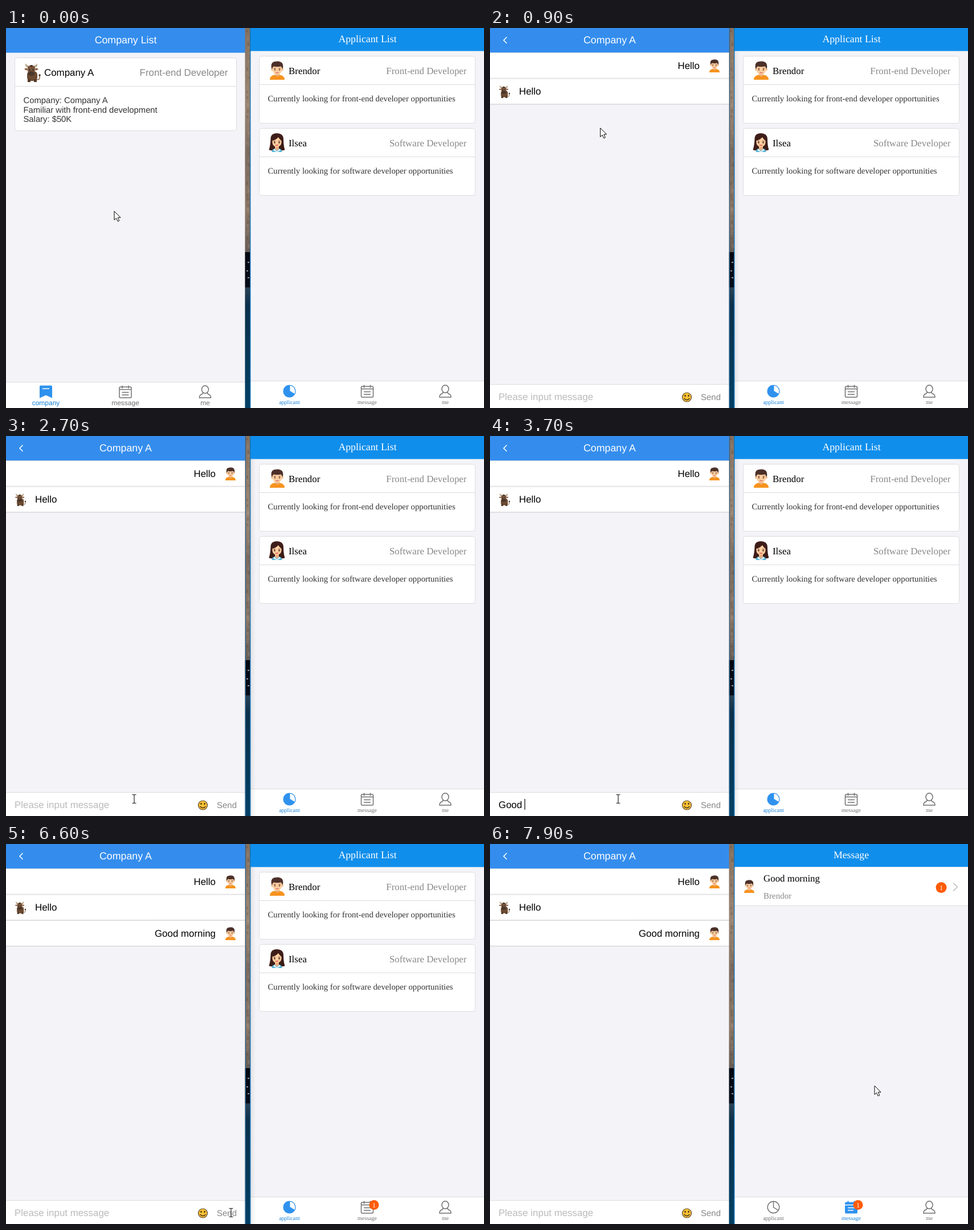
These frames come from a looping animation (839 by 668 pixels, 8000 ms). An HTML page:

```html
<!DOCTYPE html>
<html lang="en">
<head>
<meta charset="utf-8">
<title>Job chat</title>
<style>
  html, body { margin: 0; width: 100%; height: 100%; overflow: hidden; background: #f4f4f8; }
  svg { display: block; }
  text { white-space: pre; text-rendering: geometricPrecision; }
  .sans { font-family: "Liberation Sans", Arial, sans-serif; }
  .serif { font-family: "Liberation Serif", "Times New Roman", serif; }
  .title { font-size: 17.8px; fill: #fff; text-anchor: middle; }
  .main { font-size: 16.9px; fill: #000; }
  .role { font-size: 16.9px; fill: #888; text-anchor: end; }
  .body { font-size: 14.8px; fill: #333; }
  .hint { font-size: 15px; fill: #888; }
  .end { text-anchor: end; }
  .mid { text-anchor: middle; }
  .card { fill: #fff; stroke: #dcdce0; }
  .line { stroke: #dcdce0; }
  .rule { stroke: #d8d8dc; stroke-width: 1.6; }
  .off { color: #707070; }
  .on { color: #2f92ee; }
  .on text { fill: #1280d8; }
  .badge { fill: #ff5b05; }
</style>
</head>
<body>
<svg width="839" height="668" viewBox="0 0 839 668">
  <defs>
    <linearGradient id="photo" x1="0" y1="0" x2="0" y2="1">
      <stop offset="0" stop-color="#85705f"/>
      <stop offset=".2" stop-color="#9a8573"/>
      <stop offset=".34" stop-color="#7d6c5f"/>
      <stop offset=".48" stop-color="#8d7867"/>
      <stop offset=".59" stop-color="#665b54"/>
      <stop offset=".59" stop-color="#04070f"/>
      <stop offset=".682" stop-color="#070c18"/>
      <stop offset=".682" stop-color="#2c4254"/>
      <stop offset=".73" stop-color="#0b304a"/>
      <stop offset="1" stop-color="#024064"/>
    </linearGradient>
    <linearGradient id="shade">
      <stop offset="0" stop-color="#000" stop-opacity=".07"/>
      <stop offset="1" stop-color="#000" stop-opacity="0"/>
    </linearGradient>

    <symbol id="boy" viewBox="0 0 28 33">
      <path d="M1 33Q1 26 9 24.5H19Q27 26 27 33Z" fill="#f7931e"/>
      <path d="M10 20H18V25Q14 29 10 25Z" fill="#eeb183"/>
      <circle cx="5" cy="15" r="2" fill="#f3b98a"/>
      <circle cx="23" cy="15" r="2" fill="#f3b98a"/>
      <path d="M5.500 8H22.500V15Q21 23.500 14 24Q7 23.500 5.500 15Z" fill="#fdcc9d"/>
      <path d="M4 13Q2 2 10 1Q19-1 23 4Q25 7 24 13L22.500 13.500Q22.500 10.500 20.500 9.500Q13 11 8 9.500Q5.500 10.500 5.500 13.500Z" fill="#4c3029"/>
      <path d="M8 13H11.500M16.500 13H20" stroke="#5a382c"/>
      <circle cx="10" cy="15.500" r="1.100" fill="#412a24"/>
      <circle cx="18" cy="15.500" r="1.100" fill="#412a24"/>
      <path d="M11.500 20Q14 21.500 16.500 20" fill="none" stroke="#d0605a" stroke-width="1.200"/>
    </symbol>

    <symbol id="girl" viewBox="0 0 28 33">
      <path d="M3 10Q3 0 14 0Q25 0 25.500 10Q25.500 22 28 29Q25 31 20 30H8Q3 31 0 29Q2.500 22 3 10Z" fill="#3d1d18"/>
      <path d="M5 33Q5 28 10 27H18Q23 28 23 33Z" fill="#58b4d4"/>
      <path d="M10.500 21H17.500V27L14 31L10.500 27Z" fill="#edae82"/>
      <path d="M9.500 27L14 32L18.500 27L20 30L15 33H13L8 30Z" fill="#e7f5fa"/>
      <path d="M6 13Q12 12 16.500 7Q19 11 22 13V17Q21 23.500 14 24Q7 23.500 6 17Z" fill="#fdcc9d"/>
      <path d="M8 14H11.500M16.500 14H20" stroke="#5a382c"/>
      <circle cx="10" cy="16.500" r="1.200" fill="#35201c"/>
      <circle cx="18" cy="16.500" r="1.200" fill="#35201c"/>
      <path d="M11.500 20.500Q14 22 16.500 20.500" fill="none" stroke="#d4524f" stroke-width="1.300"/>
    </symbol>

    <symbol id="ox" viewBox="0 0 31 33">
      <path d="M22 28Q29 31 28 22" fill="none" stroke="#72502f" stroke-width="1.300"/>
      <circle cx="28" cy="21" r="1.800" fill="#4a3022"/>
      <rect x="6" y="14" width="18" height="17" rx="6" fill="#6b4a31"/>
      <path d="M7 28H12V33H7ZM18 28H23V33H18Z" fill="#553a28"/>
      <path d="M7 7Q1 6 4 0Q5 3.500 9 4.500ZM20 7Q26 6 23 0Q22 3.500 18 4.500Z" fill="#b9a68c"/>
      <path d="M6.500 8.500L1 9.500Q3 13 7 12.500ZM20.500 8.500L26 9.500Q24 13 20 12.500Z" fill="#8a5a3b"/>
      <path d="M7 6Q13.500 1.500 20 6L19.500 18Q13.500 23 7.500 18Z" fill="#76533a"/>
      <path d="M10.500 4Q13.500 2 16.500 4L13.500 7Z" fill="#4d3426"/>
      <ellipse cx="13.500" cy="18" rx="6" ry="4" fill="#4b372c"/>
      <circle cx="10.500" cy="11.500" r="1.100" fill="#211916"/>
      <circle cx="16.500" cy="11.500" r="1.100" fill="#211916"/>
    </symbol>

    <g id="bookmark">
      <path d="M-11-9Q-11-11 -9-11H9Q11-11 11-9V11L0 6L-11 11Z" fill="currentColor"/>
      <path d="M-6-5.500H6" stroke="#fff" stroke-width="1.500"/>
    </g>
    <g id="note" fill="none" stroke="currentColor" stroke-width="1.500">
      <rect x="-10.500" y="-8.500" width="21" height="19" rx="2"/>
      <path d="M-5.500-11V-6M5.500-11V-6M-10-4H10M-6 1H6M-6 5.500H6"/>
    </g>
    <g id="noteOn">
      <rect x="-11" y="-9" width="22" height="20" rx="2" fill="currentColor"/>
      <path d="M-5.500-11V-6M5.500-11V-6" stroke="currentColor" stroke-width="2"/>
      <path d="M-11-4H11M-6 1H6M-6 5.500H4" stroke="#fff" stroke-width="1.400"/>
    </g>
    <g id="me" fill="none" stroke="currentColor" stroke-width="1.500">
      <ellipse cx="0" cy="-4" rx="6" ry="6.800"/>
      <path d="M-4 1.500Q-4 4-7 5Q-10 6-10 10.500H10Q10 6 7 5Q4 4 4 1.500"/>
    </g>
    <g id="pie" fill="none" stroke="currentColor" stroke-width="1.400">
      <circle r="10.300"/>
      <path d="M0-10V0L8.500 5.500"/>
    </g>
    <g id="pieOn">
      <circle r="11" fill="currentColor"/>
      <path d="M1-9.700A9.700 9.700 0 0 1 8.700 4.300L1-.600Z" fill="#fff"/>
    </g>
  </defs>

  <rect width="839" height="668" fill="#f4f4f8"/>

  <g class="sans">
    <rect width="420" height="43.500" fill="#348ded"/>
    <g id="companies"></g>
    <g id="chat"></g>
  </g>

  <g class="serif">
    <rect x="429" width="410" height="40.500" fill="#108eeb"/>
    <g id="applicants"></g>
    <g id="inbox"></g>
    <path d="M429 620.500H839" class="line"/>
    <rect x="429" y="621" width="410" height="47" fill="#fff"/>
    <g id="tabs"></g>
    <g id="tabsMsg"></g>
    <g id="unread">
      <circle cx="646" cy="634.500" r="8.500" class="badge"/>
      <text x="646" y="638.500" font-size="12" fill="#fff" class="mid">1</text>
    </g>
  </g>

  <rect x="419.500" width="9.500" height="668" fill="url(#photo)"/>
  <g id="specks"></g>
  <path id="leftEdge" d="M420.500 0V668" stroke="#1d5f91"/>
  <path d="M428.800 0V668" stroke="#1673b5" stroke-width="1.400"/>
  <rect id="cast" x="429.500" y="41" width="9" height="627" fill="url(#shade)"/>

  <path id="arrow" d="M0 0V15.500L3.600 12.200L6.200 18L8.800 16.800L6.300 11.200H11Z" fill="#fff" stroke="#000"/>
  <path id="beam" d="M-3.500-7.500H-1Q0-7.500 0-6.500Q0-7.500 1-7.500H3.500M0-6.500V6.500M-3.500 7.500H-1Q0 7.500 0 6.500Q0 7.500 1 7.500H3.500" fill="none" stroke="#222" stroke-width="1.200"/>
</svg>

<script>
const LOOP = 8000, OPEN_CHAT = 800, FOCUS_INPUT = 1900, SEND = 6500, OPEN_INBOX = 7500;
const SEEKER = "Brendor", SEEKER2 = "Ilsea", MESSAGE = "Good morning";
const $ = id => document.getElementById(id);

const text = (x, y, cls, s) => `<text x="${x}" y="${y}" class="${cls}">${s}</text>`;
const icon = (id, x, y, w, h) => `<use href="#${id}" x="${x}" y="${y}" width="${w}" height="${h}"/>`;
const tab = (id, x, y, label, size, on) =>
  `<g class="${on ? "on" : "off"}"><use href="#${id}" x="${x}" y="${y}"/>
   <text x="${x}" y="${y + (size > 10 ? 23.5 : 22)}" class="mid" font-size="${size}" fill="currentColor">${label}</text></g>`;

function card(x, y, w, h, avatar, name, role, lines) {
  return `<rect x="${x + .5}" y="${y + .5}" width="${w}" height="${h}" rx="4" class="card"/>
    <path d="M${x + 1} ${y + 50.5}h${w - 1}" class="line"/>` + avatar +
    text(x + 52, y + 32, "main", name) + text(x + w - 14.5, y + 32, "role", role) +
    lines.map((s, i) => text(x + 15.5, y + 80 + Math.round(i * 16.6), "body", s)).join("");
}

function chatRow(y, mine, s) {
  return `<g><rect y="${y}" width="420" height="45" fill="#fff"/>
    <path d="M0 ${y + .5}H420" class="line"/><path d="M0 ${y + 45.5}H420" class="rule"/>` +
    (mine ? text(368, y + 29, "main end", s) + icon("boy", 384, y + 12, 20, 23)
          : text(51, y + 28.500, "main", s) + icon("ox", 15, y + 12, 21, 23)) + "</g>";
}

$("companies").innerHTML = text(210, 27, "title", "Company List") +
  card(15, 52, 389, 128, icon("ox", 31, 62, 31, 33), "Company A", "Front-end Developer",
    ["Company: Company A", "Familiar with front-end development", "Salary: $50K"]) +
  `<path d="M0 622.5H420" class="line"/><rect y="623" width="420" height="45" fill="#fff"/>` +
  tab("bookmark", 70, 639.5, "company", 12, true) +
  tab("note", 209.5, 639.5, "message", 12) + tab("me", 349.5, 639.5, "me", 12);

$("chat").innerHTML = text(210, 27, "title", "Company A") +
  `<path d="M29.500 16L24 21.500L29.500 27" fill="none" stroke="#fff" stroke-width="1.600"/>` +
  chatRow(43, true, "Hello") + chatRow(88.5, false, "Hello") +
  `<g id="sent">${chatRow(134, true, MESSAGE)}</g>
  <path d="M0 626.500H420" class="line"/><rect y="627" width="420" height="41" fill="#fff"/>
  <text id="input" x="15" y="653.500" font-size="16.900"></text>
  <rect id="caret" y="638" width="1.200" height="19"/>
  <circle cx="345.500" cy="649" r="8" fill="#fbc134" stroke="#54452c" stroke-width="1.200"/>
  <ellipse cx="342.500" cy="646.500" rx="1.200" ry="1.700" fill="#3a2814"/>
  <ellipse cx="348.500" cy="646.500" rx="1.200" ry="1.700" fill="#3a2814"/>
  <path d="M340.500 651Q345.500 656.500 350.500 651" fill="none" stroke="#3a2814" stroke-width="1.300"/>` +
  text(370, 654, "hint", "Send");

$("applicants").innerHTML = text(634.5, 25, "title", "Applicant List") +
  card(444, 49, 379, 118, icon("boy", 462, 58, 28, 33), SEEKER, "Front-end Developer",
    ["Currently looking for front-end developer opportunities"]) +
  card(444, 176, 379, 118, icon("girl", 461, 185, 29, 33), SEEKER2, "Software Developer",
    ["Currently looking for software developer opportunities"]);

$("inbox").innerHTML = text(634, 25, "title", "Message") +
  `<rect x="429" y="40.500" width="410" height="68" fill="#fff"/><path d="M429 108.500H839" class="line"/>` +
  icon("boy", 445, 63, 20, 23) + text(480, 66, "main", MESSAGE) + text(480, 95.5, "hint", SEEKER) +
  `<circle cx="792" cy="76.500" r="9.500" class="badge"/>
  <text x="792" y="80.500" font-size="12" fill="#fff" class="mid">1</text>
  <path d="M813 68.500L820.500 75.500L813 82.500" fill="none" stroke="#c7c7cc" stroke-width="1.800"/>`;

const rightTabs = inbox =>
  tab(inbox ? "pie" : "pieOn", 497.5, 638.5, "applicant", 10, !inbox) +
  tab(inbox ? "noteOn" : "note", 634, 638.5, "message", 10, inbox) +
  tab("me", 771, 638.5, "me", 10);
$("tabs").innerHTML = rightTabs(false);
$("tabsMsg").innerHTML = rightTabs(true);

// Wallpaper grain between the windows
let seed = 7;
const rand = () => (seed = seed * 16807 % 2147483647) / 2147483647;
let grain = "";
for (let y = 4; y < 390; y += 5 + rand() * 9)
  grain += `<rect x="${421 + rand() * 4}" y="${y}" width="${2 + rand() * 2}" height="${2 + rand() * 5}" fill="${rand() < .5 ? "#3f352e" : "#b9a38e"}" opacity=".2"/>`;
for (const [x, y] of [[424, 411], [422, 426], [424, 438]])
  grain += `<rect x="${x}" y="${y}" width="3" height="2" fill="#8d97a5"/>`;
$("specks").innerHTML = grain;

// Key times for each typed length
const KEYS = [[2900, 1], [3100, 2], [3400, 3], [3700, 5], [4200, 6], [4600, 7],
  [4800, 8], [5000, 9], [5100, 10], [5300, 11], [5500, 12]];

// Pointer stops: time, x, y
const PATH = [[0, 190, 322], [100, 190, 322], [450, 192, 149], [800, 192, 149], [1500, 221, 633],
  [1700, 221, 633], [1900, 225, 638], [5800, 225, 638], [6300, 395, 648], [6700, 395, 648],
  [7300, 636, 636], [7500, 636, 636], [7900, 675, 425], [8000, 675, 425]];

function pointerAt(t) {
  const i = PATH.findIndex(p => p[0] > t);
  const [t0, x0, y0] = PATH[i - 1], [t1, x1, y1] = PATH[i];
  const u = (t - t0) / (t1 - t0), e = u * u * (3 - 2 * u);
  return [x0 + (x1 - x0) * e, y0 + (y1 - y0) * e];
}

const show = (id, on) => { $(id).style.display = on ? "" : "none"; };

function draw(t) {
  const chat = t >= OPEN_CHAT, inbox = t >= OPEN_INBOX, sent = t >= SEND;
  show("companies", !chat);
  show("chat", chat);
  show("sent", sent);
  show("applicants", !inbox);
  show("inbox", inbox);
  show("tabs", !inbox);
  show("tabsMsg", inbox);
  show("unread", sent);

  const leftActive = t >= 300 && t < OPEN_INBOX - 100;
  show("leftEdge", leftActive);
  show("cast", leftActive);

  const key = sent ? null : KEYS.filter(k => k[0] <= t).pop();
  const typed = key ? MESSAGE.slice(0, key[1]) : "";
  const input = $("input");
  input.textContent = typed || "Please input message";
  input.setAttribute("fill", typed ? "#000" : "#bbb");

  const since = t - (key ? key[0] : FOCUS_INPUT);
  const caretOn = t >= FOCUS_INPUT && t < SEND - 100 && since % 1000 < 500;
  show("caret", caretOn);
  if (caretOn) $("caret").setAttribute("x", typed ? 14.5 + input.getComputedTextLength() : 15);

  const [x, y] = pointerAt(t);
  const beam = (t >= 400 && t < OPEN_CHAT) || (t >= FOCUS_INPUT && t < 6800);
  show("beam", beam);
  show("arrow", !beam);
  $(beam ? "beam" : "arrow").setAttribute("transform", `translate(${x.toFixed(1)} ${y.toFixed(1)})`);
}

const start = performance.now();
function tick() {
  const t = (performance.now() - start) % LOOP;
  draw(Math.floor(t / 100) * 100);
  requestAnimationFrame(tick);
}
tick();
</script>
</body>
</html>
```
